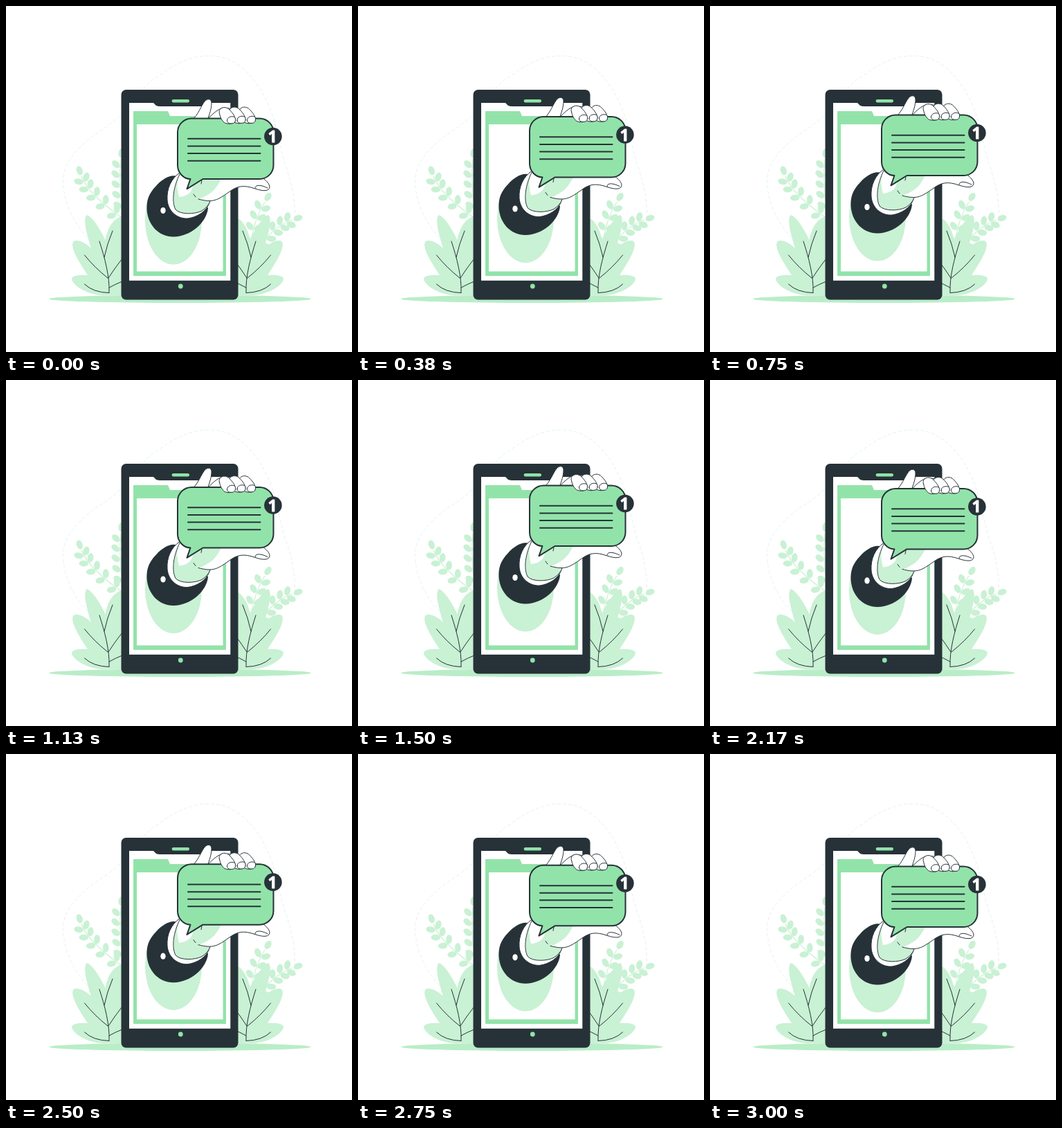
Recreate the animation shown at these times as an HTML page. Size 500 by 500 pixels, loop 3040 ms.

```html
<!DOCTYPE html>
<html lang="en">
<head>
<meta charset="utf-8">
<title>Message from a phone</title>
<style>
  html, body { margin: 0; width: 100%; height: 100%; overflow: hidden; background: #fff; }
  svg { display: block; width: 100vw; height: 100vh; }
  .green { fill: #92e3a9; }
  .pale { fill: #c9f1d4; }
  .dark { fill: #263238; }
  .white { fill: #fff; }
  .line { fill: none; stroke: #263238; stroke-linecap: round; stroke-linejoin: round; }
  .skin { fill: #fff; stroke: #263238; stroke-linecap: round; stroke-linejoin: round; }
  .sprig path { fill: none; stroke: #c9f1d4; stroke-width: 1.2; }
  .badge { font: 700 23px "Open Sans", sans-serif; text-anchor: middle; fill: #fff; stroke: #fff; stroke-width: .8; stroke-linejoin: round; }
</style>
</head>
<body>
<svg viewBox="0 0 500 500">
  <defs>
    <g id="plant">
      <g class="pale">
        <path d="M117 302C110 307 118 334 123 350C114 341 101 336 97 341C93 350 105 369 118 389C108 388 96 389 95 394C95 403 118 420 149 418L170 418L170 366C164 362 158 372 154 365C149 346 130 307 117 302Z"/>
        <path d="M167 304C152 309 144 325 142 350C142 375 150 390 167 400Z"/>
      </g>
      <g class="line" stroke-width="1">
        <path d="M149 414C150 391 143 365 135 340"/>
        <path d="M154 325Q146 344 142 363"/>
        <path d="M113.500 360Q128 378 147 393"/>
        <path d="M113.500 402Q126 414 149 414.500"/>
        <path d="M168 365Q157 379 148 393"/>
        <path d="M168 398Q158 402 149 407"/>
      </g>
    </g>
  </defs>

  <path fill="none" stroke="#d9f2ee" stroke-width=".8" stroke-dasharray="5 3"
    d="M130 345C103 325 84 290 82 253C83 224 107 199 142 177C179 153 190 118 222 100C244 84 265 72 295 72C330 72 360 100 378 140C392 170 394 204 406 236C415 265 420 290 416 318"/>

  <ellipse fill="#b9edc8" cx="251.500" cy="423.300" rx="189.500" ry="5.700"/>
  <g class="sprig pale" id="sprigs"></g>
  <use href="#plant"/>
  <use href="#plant" transform="translate(496 0) scale(-1 1)"/>

  <rect class="dark" x="166.500" y="121" width="169" height="303.500" rx="7"/>
  <rect class="white" x="178" y="140" width="146.300" height="256.800"/>
  <path class="dark" d="M211 139C216 141 215 145 222 145H282C289 145 288 141 293 139Z"/>
  <rect class="green" x="239.700" y="135" width="25.300" height="4.500" rx="2.200"/>
  <circle class="green" cx="252.300" cy="405" r="3.400"/>
  <path class="green" fill-rule="evenodd" d="M184 152H234L237 159H318V390H184ZM189 171V383.500H313.500V171Z"/>

  <g id="hand">
    <ellipse class="pale" cx="242" cy="310" rx="41" ry="63.500"/>
    <path class="dark" d="M247 246C237 243 225 251 217 260C206 271 203 281 203.500 294C205 317 221 333.500 242 333.500C267 333 290 313 292 292Q291 289 287 290Z"/>
    <ellipse class="white" cx="227" cy="295.500" rx="3.700" ry="4.600"/>
    <path class="skin" d="M251 241C239 249 232 264 233 280C234 297 248 308 263 307C276 305 290 297 294 284L280 245Z"/>
    <path class="pale" d="M250 245C243 261 240 281 245 294C252 302 273 301 283 296C289 292 293 288 295 282L318 268L326 245Z"/>
    <path class="white" d="M251 240C246 254 247 265 250 276C261 275 268 270 270 261L264 244Z"/>
    <path class="white" d="M278 279C300 272 306 260 313 246H368C374 250 381 256 381 262C380 268 372 267 360 264C343 258 334 260 322 269C305 281 297 284 278 279Z"/>
    <g class="line" stroke-width="1">
      <path d="M251 243C242 261 239 282 245 294C252 302 273 301 283 296C289 292 293 288 295 282"/>
      <path d="M278 279C300 285 306 280 322 269C334 260 343 258 360 264C372 268 381 268 381 261C380 255 374 251 368 246"/>
      <path d="M360 263C360 258 368 258 378 263M271 272L274 276M283 252L282 257"/>
    </g>
    <path class="skin" d="M269 165C278 157 282 144 287 138C291 133 297 134 297 140C297 149 294 156 291 165Z"/>
    <path class="skin" d="M291 164C300 154 307 149 314 147L340 150L350 166Z"/>

    <path class="green" stroke="#263238" stroke-width="2" stroke-linejoin="round"
      d="M268 162.500H366.500A20 20 0 0 1 386.500 182.500V230A20 20 0 0 1 366.500 250H284.500L261.500 264.300L266.500 250A19 20 0 0 1 248 230V182.500A20 20 0 0 1 268 162.500Z"/>
    <path class="line" stroke-width="2" d="M263 191.800H367.500M263 202.500H367.500M263 213H367.500M263 223.700H367.500"/>

    <g id="fingers"></g>
    <circle class="dark" cx="385.900" cy="188.500" r="12.800"/>
    <text class="badge" x="385" y="197">1</text>
  </g>
</svg>
<script>
  const byId = id => document.getElementById(id);

  // A curved stem with paired leaves and one leaf at its tip.
  function sprig([x0, y0], [cx, cy], [x1, y1], pairs) {
    const leaf = (x, y, angle) => {
      const px = x + 8.5 * Math.cos(angle), py = y + 8.5 * Math.sin(angle);
      const place = `translate(${px} ${py}) rotate(${angle * 180 / Math.PI})`;
      return `<ellipse rx="6.7" ry="4.4" transform="${place}"/>`;
    };
    let art = `<path d="M${x0} ${y0}Q${cx} ${cy} ${x1} ${y1}"/>`;
    for (let i = 0; i <= pairs; i++) {
      const t = i / (pairs + 0.5), u = 1 - t;
      const x = u * u * x0 + 2 * u * t * cx + t * t * x1;
      const y = u * u * y0 + 2 * u * t * cy + t * t * y1;
      const dir = Math.atan2(u * (y0 - cy) + t * (cy - y1), u * (x0 - cx) + t * (cx - x1));
      art += i ? leaf(x, y, dir - 0.85) + leaf(x, y, dir + 0.85) : leaf(x, y, dir);
    }
    return art;
  }

  byId("sprigs").innerHTML =
    sprig([109, 246], [117, 270], [170, 308], 5) +
    sprig([166, 221], [162, 258], [170, 300], 5) +
    sprig([374, 283], [358, 308], [352, 352], 4) +
    sprig([414, 309], [388, 317], [360, 354], 5);

  const finger = (x, y) => `<g transform="translate(${x} ${y})" class="skin">
    <path d="M-17 -9C-20 -17 -9 -21 -3 -15C2 -10 6 -5 6 1C5 6 -5 7 -10 4C-14 1 -16 -4 -17 -9Z"/>
    <path d="M-6 1C-6 -4 0 -6 5 -4C7 -1 6 4 3 5C-2 6 -6 5 -6 1Z"/></g>`;
  byId("fingers").innerHTML = finger(354.500, 164) + finger(340, 164) + finger(325.500, 164.500);

  const LOOP = 3040, CYCLE = 3000, RISE = 10, STEP = 1000 / 24;
  const start = performance.now();

  function draw(now) {
    const t = Math.max(0, now - start) % LOOP;
    const time = Math.min(CYCLE, Math.floor((t + 5) / STEP) * STEP);
    const lift = RISE * (1 - Math.abs(1 - 2 * time / CYCLE));
    byId("hand").setAttribute("transform", `translate(0 ${-lift})`);
    requestAnimationFrame(draw);
  }
  draw(start);
</script>
</body>
</html>
```
